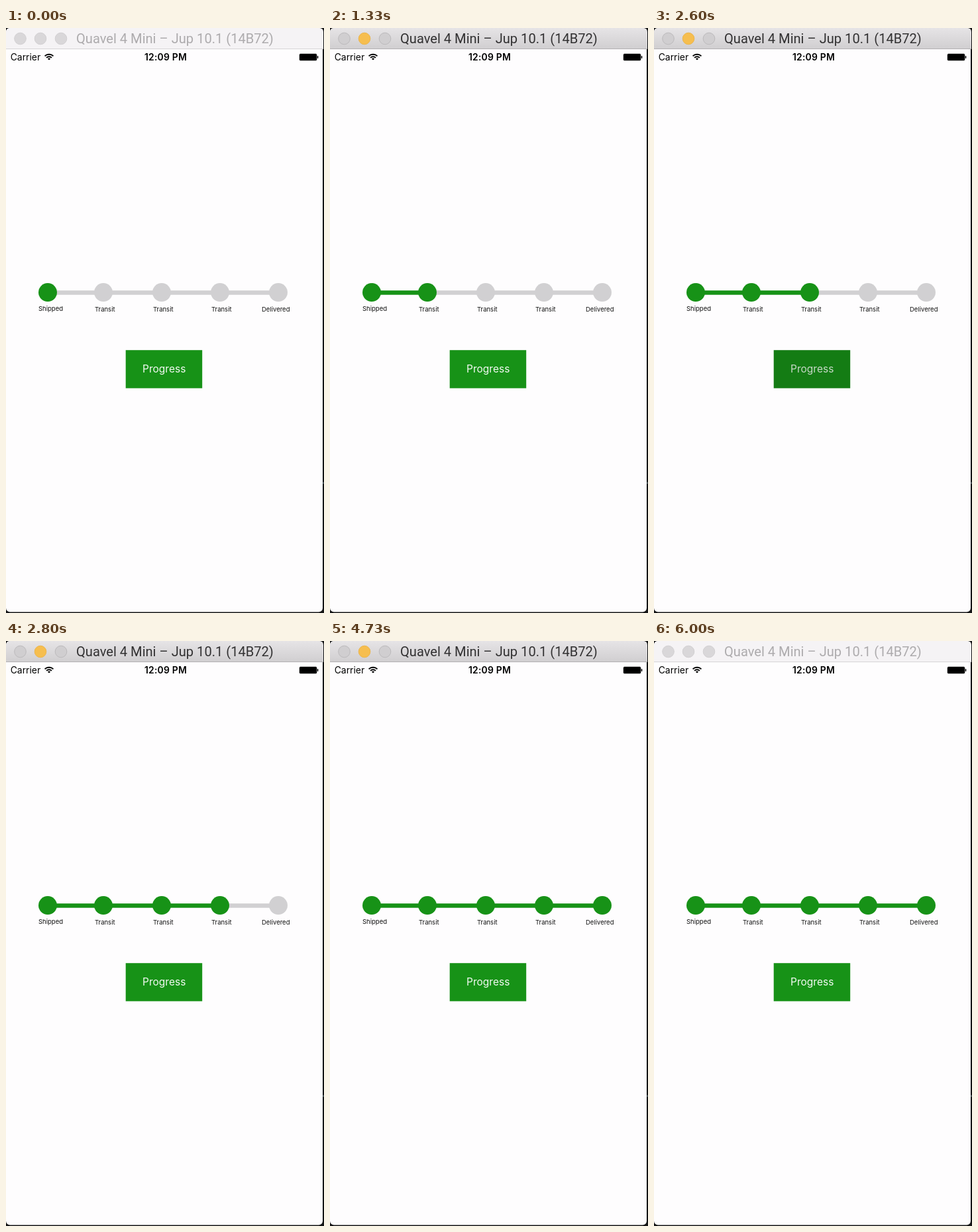
An HTML page for the animation above (6070 ms loop, 480x883 px).

```html
<!DOCTYPE html>
<html lang="en">
<head>
<meta charset="utf-8">
<title>Delivery progress</title>
<style>
  html, body { margin: 0; width: 100%; height: 100%; overflow: hidden; background: #141516; }
  svg { display: block; font-family: Inter, Roboto, sans-serif; }
  #title { font: 20.1px Roboto, sans-serif; }
  .status { font-size: 13.9px; }
  .clock { font-weight: 600; text-anchor: middle; letter-spacing: .2px; }
  .label { font-size: 9.5px; fill: #111; }
  #caption { font-size: 15.5px; text-anchor: middle; }
</style>
</head>
<body>
<svg id="stage" width="480" height="883" viewBox="0 0 480 883">
  <defs>
    <linearGradient id="chrome" x2="0" y2="1">
      <stop stop-color="#e6e4e6"/>
      <stop offset="1" stop-color="#d0ced0"/>
    </linearGradient>
  </defs>
  <rect width="478" height="881.5" rx="6" fill="#fefdfe"/>
  <path id="bar" d="M0 32V6Q0 0 6 0H473Q479 0 479 6V32Z"/>
  <rect id="edge" y="31" width="479" height="1"/>
  <g id="lights"></g>
  <text id="title" x="106" y="23">Quavel 4 Mini – Jup 10.1 (14B72)</text>

  <text class="status" x="6.7" y="49">Carrier</text>
  <g fill="none" stroke="#000" stroke-width="2">
    <path d="M58.6 42.4A9 9 0 0 1 71.4 42.4M61.1 44.9A5.5 5.5 0 0 1 68.9 44.9"/>
    <path d="M65 48.6L62.9 46.5A3 3 0 0 1 67.1 46.5Z" fill="#000" stroke="none"/>
  </g>
  <text class="status clock" x="241" y="49">12:09 PM</text>
  <rect x="443" y="39" width="26" height="10" rx="1.5" stroke="#000" stroke-opacity=".4"/>
  <rect x="469.7" y="42" width="1.6" height="4" rx=".8"/>

  <g id="track"></g>
  <rect id="button" x="180.7" y="486.2" width="115.5" height="57.5"/>
  <text id="caption" x="238.7" y="520.3">Progress</text>
  <rect x="478" y="685.5" width="2" height="2.5" fill="#4a575b"/>
</svg>
<script>
const LOOP = 6070, GREEN = '#179217', GRAY = '#d1d0d2';
const ACTIVE_FROM = 870, ACTIVE_TO = 4930;
// Each tap: press, step reached, release (ms).
const TAPS = [[1000, 1070, 1270], [1870, 1930, 2130], [2600, 2670, 2800], [3600, 3670, 3800]];
const STOPS = [63, 147, 235, 323, 411];
const LABELS = [['Shipped', 49], ['Transit', 134], ['Transit', 222], ['Transit', 310], ['Delivered', 386]];

const $ = id => document.getElementById(id);
const fill = (el, color) => el.setAttribute('fill', color);

function add(parent, tag, attrs, text = '') {
  const el = document.createElementNS('http://www.w3.org/2000/svg', tag);
  for (const key in attrs) el.setAttribute(key, attrs[key]);
  el.textContent = text;
  return parent.appendChild(el);
}

const lights = [21.5, 52, 83].map(cx => add($('lights'), 'circle', { cx, cy: 16, r: 8.8 }));
const lines = STOPS.slice(1).map((x, i) =>
  add($('track'), 'rect', { x: STOPS[i], y: 396.2, width: x - STOPS[i], height: 6.5 }));
const dots = STOPS.map(cx => add($('track'), 'circle', { cx, cy: 399.1, r: 14 }));
LABELS.forEach(([name, x], i) =>
  add($('track'), 'text', { class: 'label', x, y: i ? 428.3 : 427 }, name));

function draw(t) {
  const active = t >= ACTIVE_FROM && t < ACTIVE_TO;
  const pressed = TAPS.some(([down, , up]) => t >= down && t < up);
  const step = TAPS.filter(([, reached]) => t >= reached).length;

  fill($('bar'), active ? 'url(#chrome)' : '#f5f3f5');
  fill($('edge'), active ? '#b3b1b3' : '#d6d4d6');
  fill($('title'), active ? '#323132' : '#adabad');
  lights.forEach((el, i) => {
    fill(el, !active ? '#d9d7d9' : i === 1 ? '#f6be4f' : '#d0ced0');
    el.setAttribute('stroke', !active ? '#d2d0d2' : i === 1 ? '#ebb54b' : '#bcbabc');
  });

  dots.forEach((el, i) => fill(el, i <= step ? GREEN : GRAY));
  lines.forEach((el, i) => fill(el, i < step ? GREEN : GRAY));
  fill($('button'), pressed ? '#147c14' : GREEN);
  fill($('caption'), pressed ? '#c8d9c8' : '#f4faf4');
}

const start = performance.now();
function tick() {
  draw((performance.now() - start) % LOOP);
  requestAnimationFrame(tick);
}
tick();
</script>
</body>
</html>
```
